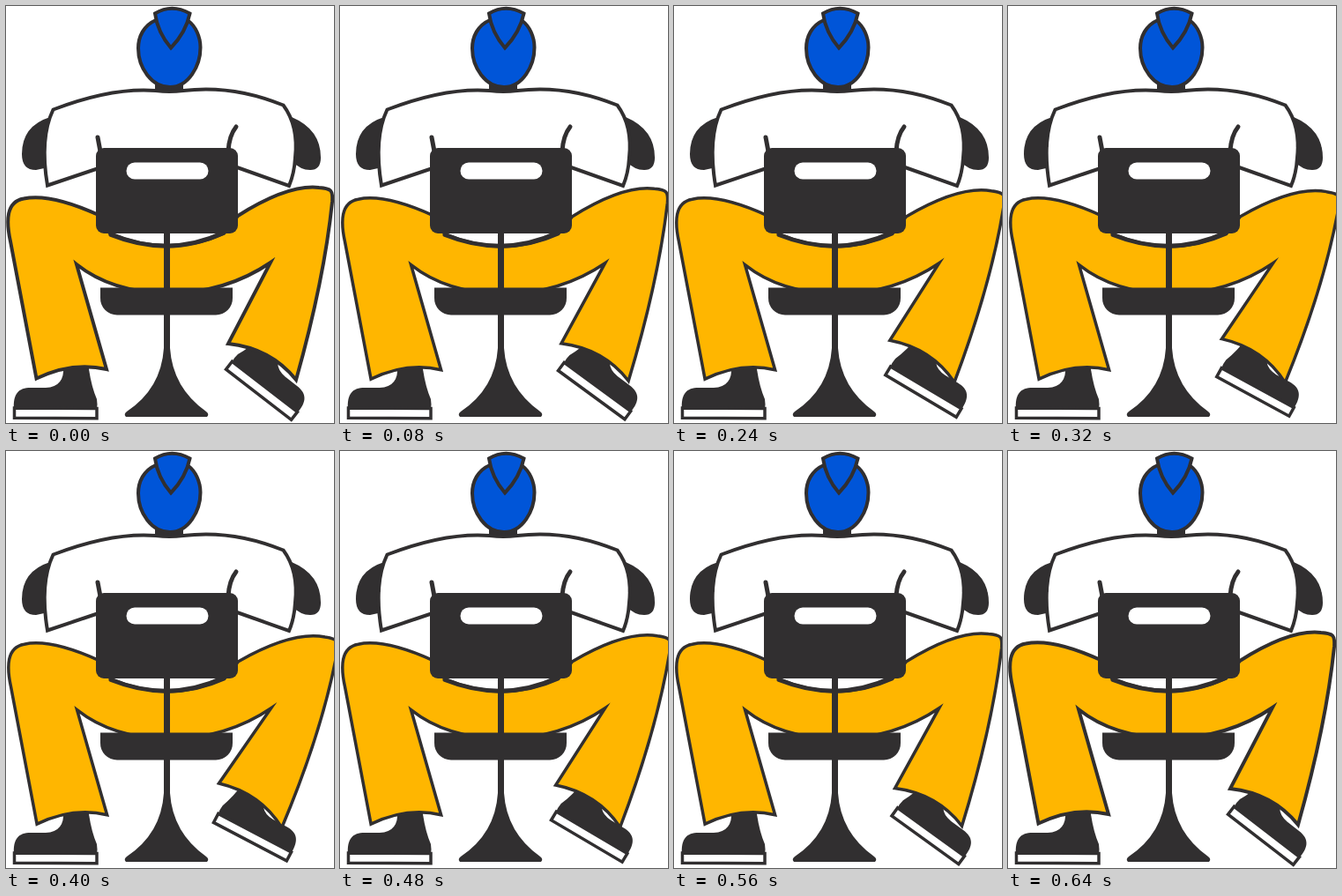
An HTML page for the animation above (2 s loop, 372 px wide and 473 px high).

```html
<!DOCTYPE html>
<html lang="en">
<head>
<meta charset="utf-8">
<title>Swinging leg</title>
<style>
  html, body { margin: 0; width: 100%; height: 100%; overflow: hidden; background: #fff; }
  svg { display: block; }
  .dark { fill: #312f30; }
  .line { stroke: #312f30; stroke-width: 4; stroke-miterlimit: 8; }
</style>
</head>
<body>
<svg width="372" height="473" viewBox="0 0 372 473">
  <defs>
    <g id="shoe">
      <path class="dark" d="M9 457C8 440 14 433 28 433H45Q67 432 65 408V400H94V412Q97 432 103 446Q104 452 103 457Z"/>
      <path class="line" fill="#fff" d="M9.500 456L103 456.500V467.800L9.500 467.200Z" style="stroke-width:3.5"/>
    </g>
  </defs>

  <!-- head, arms, shirt -->
  <path class="dark" d="M169 86H201V98H169ZM50 126Q18 136 18 168Q18 186 34 186L48 183ZM324 126Q357 140 357 172Q357 186 345 186Q334 186 324 176Z"/>
  <path class="line" fill="#0055d8" d="M170 16C156 22 150 35 150 48C150 70 165 92 186 92C207 92 220.500 68 220.500 47C220.500 35 215 23 207 17Z"/>
  <path class="line" fill="#0055d8" d="M169 8.500Q188 -3 208.500 8.500Q204 30 187 47.500Q172 30 169 8.500Z"/>
  <path class="line" fill="#fff" d="M105 184L47 203.500Q38 150 53.500 117.500Q120 92 170 96Q185 98 201 96Q257 89 314.500 112.500Q332 136 328 172Q327 190 321 204L262 183"/>
  <path class="line" fill="none" stroke-linecap="round" d="M104 149L107 165M261 137Q253 147 252 165" style="stroke-width:5"/>

  <!-- legs -->
  <use href="#shoe"/>
  <use href="#shoe" id="foot"/>
  <path id="pants" class="line" fill="#ffb600"/>
  <path class="line" fill="none" stroke-linecap="round" d="M119 259.500Q185 286 247 257" style="stroke-width:5"/>

  <!-- chair -->
  <g class="dark">
    <rect x="102" y="161" width="161" height="97" rx="9"/>
    <rect x="179" y="256" width="7" height="66"/>
    <path d="M107 319.500H257V331A19 19 0 0 1 238 350.500H126A19 19 0 0 1 107 331Z"/>
    <path d="M179 349V388Q176 434 137 460Q133 463 136 466H228Q231 463 227 460Q189 433 186 388V349Z"/>
  </g>
  <rect x="136.500" y="177.500" width="93" height="19" rx="9.500" fill="#fff"/>
</svg>
<script>
  const get = id => document.getElementById(id);
  const pants = get('pants'), foot = get('foot');
  const LOOP = 2000, STEP = 40, PEAK = 400, END = 608;
  const KNEE = [300, 291], SWING = 0.125;

  const smooth = u => u * u * (3 - 2 * u);
  const mix = (a, b, m) => a + (b - a) * m;

  // 0 = rest, 1 = leg fully swung in
  function swingAt(t) {
    if (t >= END) return 0;
    const p = t < PEAK ? smooth(t / PEAK) : smooth((END - t) / (END - PEAK));
    return p ** 0.85;
  }

  function pantsPath(m) {
    // a point turned about the inner knee; weight lets the thigh bend
    const turn = (x, y, weight = 1) => {
      const a = SWING * m * weight, c = Math.cos(a), s = Math.sin(a);
      const dx = x - KNEE[0], dy = y - KNEE[1];
      return `${KNEE[0] + dx * c - dy * s} ${KNEE[1] + dx * s + dy * c} `;
    };
    const cap = (x, y) => turn(x, y, 0.6);
    return 'M118 258L105 237Q50 212 20 218.5C0 222 0 244 5 267' +
      'L34.5 422.5Q75 403 114 412L80 293' +
      `Q120 325 185 326Q250 325 ${KNEE}` +
      `L${turn(252, 383)}Q${turn(300, 388)}${turn(329, 424)}` +
      `Q${turn(361, 310)}${cap(370, 222)}` +
      `C${cap(371, 209)}${cap(369, 207)}${cap(355, 206)}` +
      `Q${turn(320, 202, 0.4)}263 238L247 258Q185 286 118 258Z`;
  }

  function draw(now) {
    const t = Math.floor(now % LOOP / STEP) * STEP;
    const m = swingAt(t);
    const moving = t >= 40 && t < 640;
    pants.setAttribute('d', pantsPath(m));
    pants.setAttribute('transform', moving ? 'translate(.6 .7)' : '');
    pants.style.strokeWidth = moving ? 3.5 : 4;
    foot.setAttribute('transform',
      `translate(${mix(248, 234, m)} ${mix(412.5, 422, m)}) rotate(${mix(38, 28, m)}) scale(-1 1) translate(-104 -469)`);
  }

  let start;
  function tick(now) {
    start ??= now;
    draw(now - start);
    requestAnimationFrame(tick);
  }
  draw(0);
  requestAnimationFrame(tick);
</script>
</body>
</html>
```
